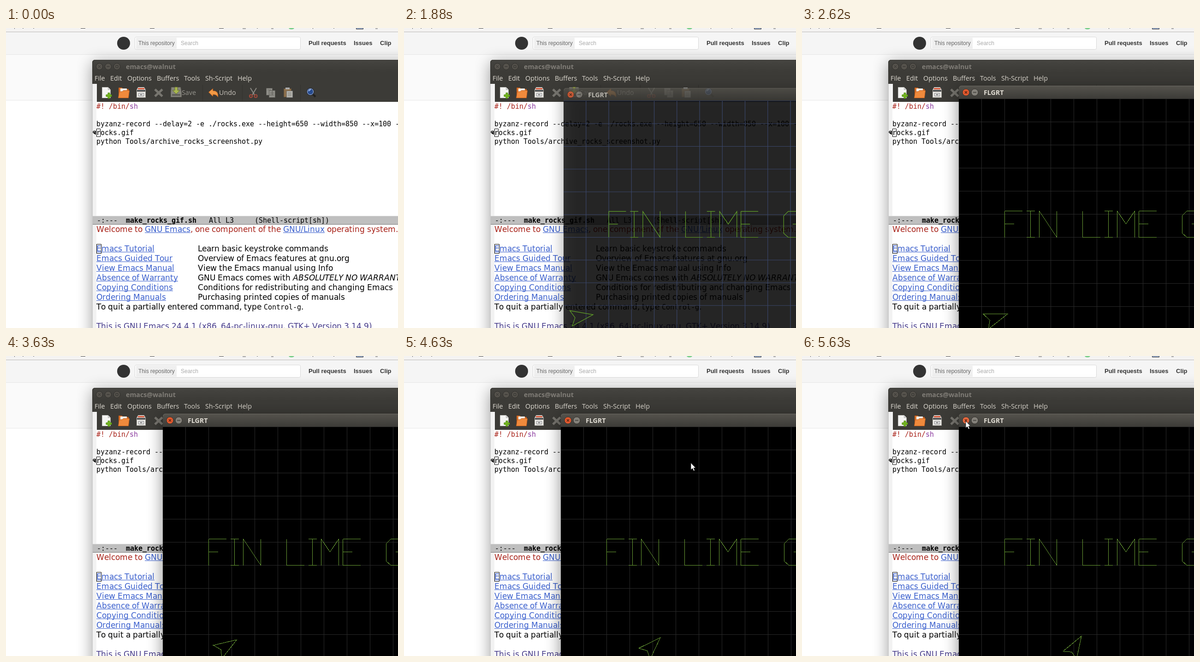
Recreate the animation shown at these times as an HTML page. Size 850x650 px, loop 5650 ms.

```html
<!DOCTYPE html>
<html lang="en">
<head>
<meta charset="utf-8">
<title>Desktop</title>
<style>
  html, body { margin: 0; width: 100%; height: 100%; overflow: hidden; background: #fff; }
  svg { display: block; width: 850px; height: 650px; }
  text { white-space: pre; }
  .web { font: 12px "Liberation Sans", Arial, sans-serif; }
  .nav { font: bold 13px "Liberation Sans", Arial, sans-serif; fill: #333; }
  .ui { font: 14.3px "Open Sans", "Noto Sans", sans-serif; fill: #dfdbd2; }
  .title { font: bold 14.2px "Open Sans", "Noto Sans", sans-serif; }
  .doc { font: 17px "DejaVu Sans", sans-serif; }
  .mono { font: 15px "DejaVu Sans Mono", monospace; }
  .link { fill: #3a5fcd; }
  .vec { fill: none; }
</style>
</head>
<body>
<svg viewBox="0 0 850 650">
  <defs>
    <filter id="soft" x="-20%" y="-20%" width="140%" height="140%"><feGaussianBlur stdDeviation="17"/></filter>
    <linearGradient id="bar" x2="0" y2="1">
      <stop offset="0" stop-color="#55534d"/><stop offset="1" stop-color="#3c3b37"/>
    </linearGradient>
    <linearGradient id="dim" x2="0" y2="1">
      <stop offset="0" stop-color="#454440"/><stop offset="1" stop-color="#3c3b37"/>
    </linearGradient>
  </defs>

  <!-- web page -->
  <rect width="850" height="650" fill="#fff"/>
  <rect width="850" height="57" fill="#f5f5f5"/>
  <rect y="57" width="850" height="99" fill="#fafafa"/>
  <path d="M0 57.5H850M0 156.5H850" stroke="#e6e6e6"/>
  <rect width="850" height="8" fill="#f4f3f2"/>
  <path d="M0 8.5H850" stroke="#b9b7b4"/>
  <path d="M18.5 0V2M36 .5h2M59 .5h2M513 1.5h7M544 .5h2M575 1.5h5M665.5 0V2M801 1.5h5M710 .5h2" stroke="#666"/>
  <path d="M162 .5h10M312 .5h10M462 .5h10" stroke="#444"/>
  <path d="M759.500 0V2.500H774.500V0" fill="#8fa3c4" stroke="#444"/>
  <path d="M613 0h12q-1 3-6 3t-6-3" fill="#7ccf8b"/>
  <circle cx="255" cy="33" r="14" fill="#333"/>
  <rect x="279.500" y="19.500" width="359" height="27" rx="3" fill="#fff" stroke="#d9d9d9"/>
  <path d="M282 21H370V45H282Z" fill="#efefef"/>
  <g class="web">
    <text x="287" y="37" fill="#666">This repository</text>
    <text x="379" y="37" fill="#aaa">Search</text>
  </g>
  <g class="nav">
    <text x="656" y="37">Pull requests</text><text x="754" y="37">Issues</text><text x="811" y="37">Clip</text>
  </g>

  <!-- editor window -->
  <rect x="187" y="75" width="900" height="800" opacity=".38" filter="url(#soft)"/>
  <path d="M187 650V75q0-6 6-6H850V650Z" fill="#3c3b37"/>
  <path d="M188 95V76q0-6 6-6H850V95Z" fill="url(#dim)"/>
  <path d="M187.500 95V75q0-5.500 6-5.500H850" fill="none" stroke="#33322e"/>
  <g fill="#55524c" stroke="#2f2e2b">
    <circle cx="202.500" cy="83.500" r="7"/><circle cx="221.500" cy="83.500" r="7"/><circle cx="240.500" cy="83.500" r="7"/>
    <path d="M200 81l5 5m0-5l-5 5M218.500 83.500h6M238 81h5v5h-5Z" fill="none"/>
  </g>
  <text class="title" x="260" y="89" fill="#807d77">emacs@walnut</text>
  <g class="ui" id="menu"></g>
  <path d="M187 121h10v39H850V650H187Z" fill="#fff"/>
  <path d="M187 121h9V650h-9Z" fill="#f2f2f2"/>
  <path d="M187.500 121V650" stroke="#c9c9c9"/>

  <!-- toolbar -->
  <path d="M426.500 123V158M512.500 123V158M638.500 123V158" stroke="#33322e"/>
  <g stroke-width="1">
    <path d="M208.500 128.500h13l5 5v18h-18Z" fill="#f4f4f2" stroke="#b8b8b4"/>
    <path d="M221.500 128.500v5h5" fill="#ddd" stroke="#aaa"/>
    <path d="M221 140.500h4v4h4v4h-4v4h-4v-4h-4v-4h4Z" fill="#73b51e" stroke="#4e8a0a"/>
    <path d="M244.500 148V129.500h7l2 3h12V148" fill="#d8722a" stroke="#b3541a"/>
    <path d="M248 131h14v8h-14Z" fill="#f3efe8"/>
    <path d="M243.500 151.500l2-13 7-1 2-2h13l-2 16Z" fill="#f08a3c" stroke="#c35f1e"/>
    <path d="M283.500 134l3-5.500h13l3 5.500v16.500h-19Z" fill="#e9e8e4" stroke="#aaa8a2"/>
    <path d="M286 130h14v3h-14Z" fill="#d3573a"/>
    <path d="M284 134h18v4h-18Z" fill="#555"/>
    <path d="M287.500 141.500h11v6h-11Z" fill="#fff" stroke="#777"/>
    <path d="M290 144.500h6" stroke="#666" stroke-width="2"/>
    <path d="M323 133l16 15m0-15l-16 15" stroke="#77756f" stroke-width="5"/>
    <path d="M358.500 128.500h20l2 12v9h-23v-9Z" fill="#85847c" stroke="#66645e"/>
    <path d="M360 143h18v4h-18Z" fill="#605e58"/>
    <path d="M366 128h6v7h5l-8 8-8-8h5Z" fill="#a9b84e" stroke="#626b33"/>
    <path d="M439.500 139l9-7.500v4.500q11 0 11 10v3.500q-3-6-11-5.500v4Z" fill="#f39a45" stroke="#c8641e"/>
    <path d="M530 130l9 15m4-15l-9 15" stroke="#8c8a84" stroke-width="2"/>
    <g fill="none" stroke="#a5493a" stroke-width="2"><circle cx="531" cy="147.500" r="3"/><circle cx="541.500" cy="147.500" r="3"/></g>
    <path d="M564.500 130.500h13v15h-13ZM570.500 135.500h13v15h-13Z" fill="#8f8e88" stroke="#5f5e59"/>
    <path d="M567 134h8M573 139.500h8m-8 3h8m-8 3h8" stroke="#66645f"/>
    <path d="M602.500 131.500h16v18h-16Z" fill="#8b6f4c" stroke="#66543c"/>
    <path d="M606 129h9v4h-9Z" fill="#aaa"/>
    <path d="M608.500 136.500h13v14h-13Z" fill="#b5b4ae" stroke="#777"/>
    <path d="M611 140.500h8m-8 3h8m-8 3h8" stroke="#7b7a75"/>
    <path d="M665 143l6 6" stroke="#23221f" stroke-width="4"/>
    <circle cx="660" cy="138" r="8" fill="#1f3f7d" stroke="#2a2a2c"/>
    <circle cx="660" cy="138" r="6.500" fill="#274b8f" stroke="#b9c3d4"/>
    <path d="M656.500 137q1-3.500 4.500-3.500" fill="none" stroke="#a9c4f0" stroke-width="2"/>
  </g>
  <g class="ui"><text x="381" y="145" fill="#96948d">Save</text><text x="462" y="145" fill="#c9c5bd">Undo</text></g>

  <!-- script buffer -->
  <path d="M188 407H850V426H188Z" fill="#bfbfbf"/>
  <path d="M188 407.500H850" stroke="#d9d9d9"/>
  <path d="M188 425.500H850" stroke="#777"/>
  <g class="mono snap">
    <text x="196" y="175" fill="#a8231a">#! /bin/<tspan fill="#8b3a9f">sh</tspan></text>
    <text x="196" y="213">byzanz-record --delay=2 -e ./rocks.exe --height=650 --width=850 --x=100 --y=100</text>
    <text x="196" y="232">rocks.gif</text>
    <text x="196" y="251">python Tools/archive_rocks_screenshot.py</text>
    <text x="197" y="422">-:---  <tspan font-weight="bold">make_rocks_gif.sh</tspan>   All L3     (Shell-script[sh])</text>
  </g>
  <path d="M196.500 218.500h8v17h-8Z" fill="none" stroke="#000"/>
  <path d="M195 223.500h-4q-2 0-2 2t2 2h2M194 225v5l-3.500-2.500Z" fill="none" stroke="#000" stroke-width="1.500"/>

  <!-- welcome buffer -->
  <g class="doc snap">
    <text x="196" y="442" fill="#a8231a">Welcome to <tspan class="link">GNU Emacs</tspan>, one component of the <tspan class="link">GNU/Linux</tspan> operating system.</text>
    <g id="help"></g>
    <text x="196" y="610">To quit a partially entered command, type <tspan class="mono">Control-g</tspan>.</text>
    <text x="196" y="652" fill="#483d8b">This is GNU Emacs 24.4.1 (x86_64-pc-linux-gnu, GTK+ Version 3.14.9)</text>
  </g>
  <path id="lines" class="vec" stroke="#3a5fcd"/>
  <path d="M196.500 468.500h10v20h-10Z" fill="none" stroke="#000"/>

  <!-- game window -->
  <g id="game" visibility="hidden">
    <rect id="shade" x="340" y="131" width="800" height="650" filter="url(#soft)"/>
    <g id="pane">
      <path d="M340 154V131q0-6 6-6H1140V154Z" fill="url(#bar)"/>
      <path d="M341 130q1-4.500 5-4.500H1140" fill="none" stroke="#6a6861"/>
      <rect x="340" y="153" width="800" height="628"/>
      <circle id="close" cx="355.500" cy="139.500" r="7.500" stroke="#33302b"/>
      <path d="M353 137l5 5m0-5l-5 5" stroke="#5a2412" stroke-width="1.500"/>
      <circle cx="374.500" cy="139.500" r="7.500" fill="#84817a" stroke="#33302b"/>
      <path d="M371 139.500h7" stroke="#3c3b37" stroke-width="1.500"/>
      <text class="title" x="394" y="145" fill="#dfdbd2">FLGRT</text>
    </g>
    <g id="wires">
      <path id="grid" class="vec"/>
      <path id="sign" class="vec"/>
      <path id="ship" class="vec" d="M0 0L52 0L11 32.500L14 13.300Z"/>
    </g>
  </g>
  <path id="mouse" visibility="hidden" d="M.5 0V15L4 12L6.500 17.500L9 16.500L6.500 11H11Z" fill="#fff" stroke="#111" stroke-width=".8"/>
</svg>
<script>
const $ = id => document.getElementById(id);
const LOOP = 5650, OPEN = 1840, STEP = 40;

const label = (x, y, s, cls = '') => `<text x="${x}" y="${y}" class="${cls}">${s}</text>`;

$('menu').innerHTML = [[192, 'File'], [226, 'Edit'], [263, 'Options'], [327, 'Buffers'],
  [386, 'Tools'], [432, 'Sh-Script'], [502, 'Help']].map(([x, s]) => label(x, 114, s)).join('');

$('help').innerHTML = [
  ['Emacs Tutorial', 'Learn basic keystroke commands'],
  ['Emacs Guided Tour', 'Overview of Emacs features at gnu.org'],
  ['View Emacs Manual', 'View the Emacs manual using Info'],
  ['Absence of Warranty', 'GNU Emacs comes with <tspan font-style="italic">ABSOLUTELY NO WARRANTY</tspan>'],
  ['Copying Conditions', 'Conditions for redistributing and changing Emacs'],
  ['Ordering Manuals', 'Purchasing printed copies of manuals']
].map(([a, b], i) => label(196, 484 + 21 * i, a, 'link') + label(416, 484 + 21 * i, b)).join('');

// the editor advances glyphs by whole pixels and underlines its links
const pad = document.createElement('canvas').getContext('2d');
let lines = '';
for (const text of document.querySelectorAll('.snap text')) {
  const xs = [], walk = document.createTreeWalker(text, NodeFilter.SHOW_TEXT);
  let x = +text.getAttribute('x');
  while (walk.nextNode()) {
    const run = walk.currentNode, from = x;
    pad.font = getComputedStyle(run.parentNode).font;
    for (const c of run.data) {
      xs.push(x);
      x += Math.round(pad.measureText(c).width);
    }
    if (run.parentNode.matches('.link')) lines += `M${from} ${+text.getAttribute('y') + 1.5}H${x}`;
  }
  text.setAttribute('x', xs.join(' '));
}
$('lines').setAttribute('d', lines);

// 50 px grid below the title bar
let grid = 'M340 153.5H1140';
for (let x = 389.5; x < 1140; x += 50) grid += `M${x} 153V781`;
for (let y = 203.5; y < 781; y += 50) grid += `M340 ${y}H1140`;
$('grid').setAttribute('d', grid);

// stroke letters, 38 x 57, the I is narrow
const GLYPHS = {
  F: 'h38m-38 0v57m0-29h20',
  I: 'h18m-9 0v57m-9 0h18',
  N: 'm0 57v-57l38 57v-57',
  L: 'v57h38',
  M: 'm0 57v-57l19 28l19-28v57',
  E: 'h38m-38 0v57h38m-38-29h20',
  G: 'm38 9l-9-9h-19l-10 10v38l10 9h19l9-9v-20h-18'
};
let pen = 439.5, sign = '';
for (const c of 'FIN LIME G') {
  if (c !== ' ') sign += `M${pen} 396.5${GLYPHS[c]}`;
  pen += c === 'I' ? 28 : 47;
}
$('sign').setAttribute('d', sign);

// linear interpolation through rows of [time, ...values]
function along(keys, t) {
  let i = 1;
  while (i < keys.length - 1 && t > keys[i][0]) i++;
  const a = keys[i - 1], b = keys[i];
  const u = (t - a[0]) / (b[0] - a[0]);
  return a.slice(1).map((v, j) => v + (b[j + 1] - v) * u);
}
const SHIP = [[1920, 377, 628.6], [2620, 416.3, 629.9], [3630, 474.4, 631.2], [4630, 534.3, 631.9], [5630, 590, 633]];
const MOUSE = [[4510, 776, 256], [4630, 621.5, 231.5], [4750, 581, 233], [4950, 520, 215],
  [5200, 420, 168], [5430, 354.5, 141], [5650, 354.5, 141]];

// the screen refreshes every 40 ms, with two small hitches
function refresh(t) {
  const base = t < 2420 ? OPEN : t < 3590 ? 2420 : 3590;
  return base + Math.floor((t - base) / STEP) * STEP;
}
const set = (id, props) => {
  for (const k in props) $(id).setAttribute(k, props[k]);
};
const mix = (from, to, k) => `color-mix(in srgb, ${to} ${k * 100}%, ${from})`;
const show = on => on ? 'visible' : 'hidden';

function draw(now) {
  const t = now % LOOP, s = refresh(t), on = t >= OPEN;
  set('game', { visibility: show(on) });
  set('mouse', { visibility: show(on && s >= MOUSE[0][0]) });
  if (on) {
    const k = Math.min(1, (s - OPEN) / 80), z = 0.97 + 0.03 * k, alpha = 0.55 + 0.45 * k;
    set('game', { transform: `translate(${740 * (1 - z)} ${453 * (1 - z)}) scale(${z})` });
    set('pane', { opacity: alpha });
    set('shade', { opacity: 0.45 * alpha });
    set('wires', { 'stroke-width': 1.4 - 0.4 * k, 'shape-rendering': k < 1 ? 'auto' : 'crispEdges' });
    $('grid').style.stroke = mix('#4a61a8', '#2a2a2a', k);
    $('sign').style.stroke = $('ship').style.stroke = mix('#5aa51a', '#6a9f35', k);

    const [x, y] = along(SHIP, s);
    const turn = -13.2 - 13.15 * (s - 3630) / 1000;
    set('ship', { transform: `translate(${x} ${y}) rotate(${turn}) translate(-23 -10)` });

    const [mx, my] = along(MOUSE, s);
    set('mouse', { transform: `translate(${mx} ${my})` });
    set('close', { fill: mx < 364 ? '#e8693f' : '#e2592e' });
  }
}
function tick() {
  draw(performance.now());
  requestAnimationFrame(tick);
}
tick();
</script>
</body>
</html>
```
